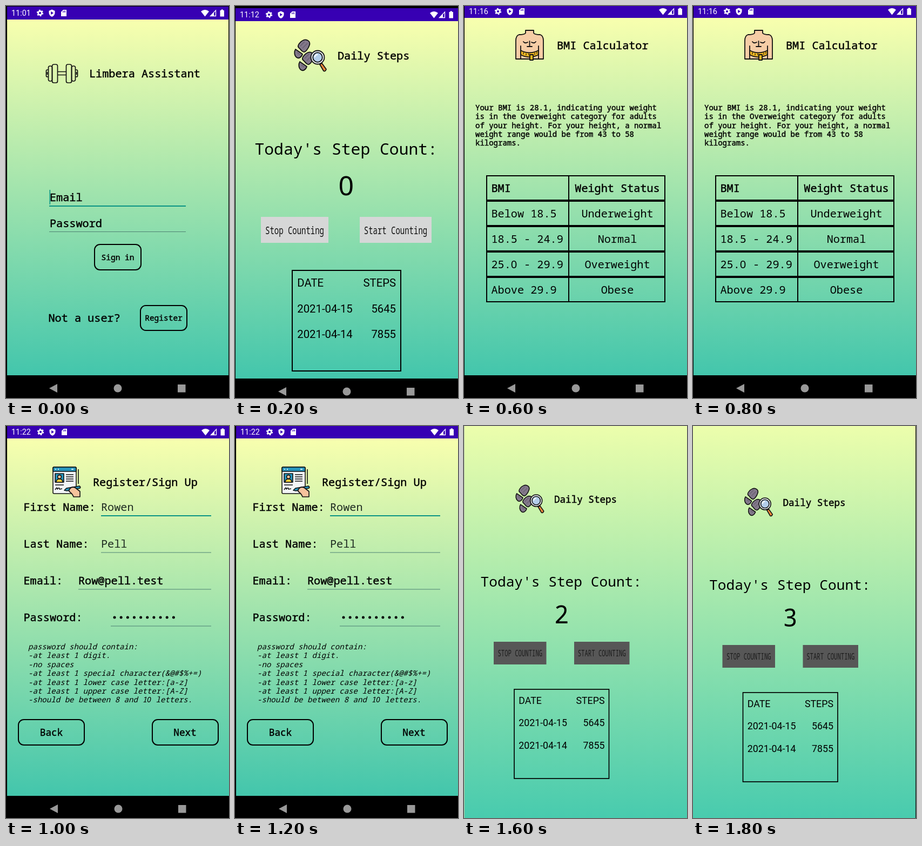
Animation of 413x725 px, one loop 2000 ms. Source, as an HTML page:

```html
<!DOCTYPE html>
<html lang="en">
<head>
<meta charset="utf-8">
<title>App tour</title>
<style>
html, body { margin: 0; width: 100%; height: 100%; overflow: hidden; background: #000; }
svg { display: block; width: 413px; height: 725px; }
text { font-family: "Noto Sans Mono", "DejaVu Sans Mono", monospace; }
.bold { stroke: currentColor; stroke-width: .45px; }
.zero { font-family: "Noto Sans", sans-serif; letter-spacing: .028em; }
.sans { font-family: Roboto, sans-serif; }
.it { font-style: italic; }
</style>
</head>
<body>
<svg id="stage" viewBox="0 0 413 725">
<defs>
  <linearGradient id="sky" x1="0" y1="0" x2="0" y2="1">
    <stop offset="0" stop-color="#f8ffae"/><stop offset="1" stop-color="#43c6ac"/>
  </linearGradient>
  <linearGradient id="skyCut" x1="0" y1="0" x2="0" y2="1">
    <stop offset="0" stop-color="#ecfeac"/><stop offset="1" stop-color="#48cbae"/>
  </linearGradient>

  <g id="dumbbell" fill="none" stroke="#111" stroke-width="1.7" stroke-linejoin="round">
    <path d="M22 14.5H38M22 20.5H38"/>
    <g id="plates">
      <rect x="12" y="1" width="10" height="34" rx="3"/>
      <rect x="5" y="4" width="7" height="28" rx="3"/>
      <path d="M5 11H3Q1 11 1 13V22Q1 24 3 24H5M3 15V20"/>
    </g>
    <use href="#plates" transform="translate(60) scale(-1 1)"/>
  </g>

  <g id="steps" stroke="#111" stroke-width="1.8" stroke-linejoin="round">
    <g id="foot" fill="#82788a">
      <path d="M9 15C5 11 13 3 18 1C24 -1 31 3 29 10C27 17 21 24 18 23C14 22 13 18 9 15Z"/>
      <path d="M3 18L16 27C14 33 9 36 5 33C1 30 0 23 3 18Z"/>
      <path d="M12 12L20 4M16 16L25 7M6 24L11 28" stroke="#655c6e" stroke-width="1.2"/>
    </g>
    <use href="#foot" transform="translate(8 23)"/>
    <path d="M48 46L52 44L60 55Q58 60 55 58Z" fill="#f08a3c"/>
    <circle cx="44" cy="33" r="12.5" fill="#e8edf2"/>
    <circle cx="44" cy="33" r="8.8" fill="#b3cdea"/>
    <path d="M39 33Q39 28 44 28" fill="none" stroke="#fff"/>
  </g>

  <g id="torso" stroke="#111" stroke-width="1.8" stroke-linejoin="round" stroke-linecap="round">
    <path d="M19 1H34V6Q36 9 46 9Q52 11 52 20V54H43V30V54H10V30V54H1V20Q1 11 7 9Q17 9 19 6Z" fill="#f6cda6"/>
    <path d="M15 22Q18 26 23 23M30 23Q35 26 38 22M26.5 21V30M22 31H31" fill="none"/>
    <path d="M10 38Q26 47 43 38V46Q26 55 10 46Z" fill="#f5b922"/>
    <path d="M27 46H33V56H27Z" fill="#f5b922"/>
    <path d="M15 42V45M20 44V47M25 44V47M36 43V46M40 41V44" stroke-width="1.2"/>
  </g>

  <g id="form" stroke="#111" stroke-width="1.6" stroke-linejoin="round">
    <rect x="1" y="1" width="43" height="49" rx="2" fill="#f2f5f7"/>
    <path d="M1 9V3Q1 1 3 1H42Q44 1 44 3V9Z" fill="#2695bd"/>
    <path d="M5 5H7M10 5H12M35 5H39" stroke="#fff"/>
    <rect x="5" y="13" width="16" height="16" fill="#2695bd"/>
    <path d="M7 29Q7 23 13 23Q19 23 19 29Z" fill="#ffd13b"/>
    <circle cx="13" cy="19" r="3.4" fill="#f6c39c"/>
    <path d="M25 15H39M25 19H39M25 23H39M25 27H39M5 34H21M48 5V32M5 43Q9 36 9 42Q13 37 13 42L18 41" fill="none"/>
    <path d="M22 44L26 40L50 36Q53 38 51 40L27 45Z" fill="#2695bd"/>
    <path d="M31 43Q35 36 42 39L51 46V56H39Q37 50 31 46Z" fill="#f6c39c"/>
  </g>

  <g id="home" stroke="#111" stroke-width="1.8" stroke-linejoin="round">
    <rect x="1" y="1" width="57" height="45" rx="3" fill="#d9dce0"/>
    <path d="M1 8V4Q1 1 4 1H55Q58 1 58 4V8Z" fill="#45a4ee"/>
    <path d="M4 4.5H6M8 4.5H10M12 4.5H14M42 43H50M52 43H55"/>
    <path d="M19 24V36H40V24L29.500 15Z" fill="#ffd23e"/>
    <path d="M14 26L29.500 13L45 26L42 28L29.500 18L17 28Z" fill="#f0b62a"/>
    <path d="M25 36V28H34V36" fill="#a88a35"/>
  </g>

  <g id="person" stroke="#222c3c" stroke-width="1.1" stroke-linejoin="round">
    <circle cx="18" cy="18" r="17.500" fill="#c5ddfa"/>
    <path d="M5 31Q6 23 14 22H22Q30 23 31 31Q18 41 5 31Z" fill="#34588a"/>
    <path d="M14 22L18 33L22 22Z" fill="#fff"/>
    <path d="M17 24H19L20 30L18 33L16 30Z" fill="#c8453c"/>
    <path d="M12 10V15Q13 22 18 22Q23 22 24 15V10Z" fill="#f8d2b3"/>
    <path d="M11 14Q9 5 16 4Q25 2 25 14L23 10H13Z" fill="#2d4a63"/>
  </g>

  <g id="status" fill="#fff">
    <circle cx="63" r="3.400" fill="none" stroke="#fff" stroke-width="2.600"/>
    <circle cx="63" r="5.200" fill="none" stroke="#fff" stroke-width="2" stroke-dasharray="2.720"/>
    <path d="M85 -6.500L90.500 -4V0Q90 5 85 7Q80 5 79.500 0V-4Z"/>
    <path d="M83.200 -3L88 0L83.200 3Z" fill="#3700b3"/>
    <path d="M106 -6H112V6H102V-2Z"/>
    <path d="M105.500 -3.500V-1M107.500 -4.500V-1M109.500 -4.500V-1" stroke="#3700b3"/>
    <path d="M368.500 6.500L361 -3Q368.500 -9 376 -3Z"/>
    <path d="M378.500 5.500H388.500V-5Z" fill="none" stroke="#fff" stroke-width="1.300"/>
    <path d="M378 6L385 -1V6Z"/>
    <path d="M396.500 -5H398.500V-6.500H402V-5H404V6.500H396.500Z"/>
  </g>
  <g id="nav" fill="#999">
    <path d="M80 0L95 -8V8Z"/><circle cx="207" r="7.500"/><rect x="318" y="-7" width="14.500" height="14.500"/>
  </g>
</defs>
</svg>
<script>
const stage = document.getElementById('stage');
const TITLE = 20.2;
const TEAL = '#0b9484';
const NAME = 'Rowen';

const text = (s, x, y, size, cls = '', extra = '') =>
  `<text x="${x}" y="${y}" font-size="${size}" class="${cls}" ${extra}>${
    cls.includes('sans') ? s : s.replace(/0/g, '<tspan class="zero">0</tspan>')}</text>`;
const mid = (s, x, y, size, cls) => text(s, x, y, size, cls, 'text-anchor="middle"');
const end = (s, x, y, size, cls) => text(s, x, y, size, cls, 'text-anchor="end"');
const icon = (id, x, y, k = 1) => `<use href="#${id}" transform="translate(${x} ${y}) scale(${k})"/>`;
const fill = (x, y, w, h, color) => `<rect x="${x}" y="${y}" width="${w}" height="${h}" fill="${color}"/>`;
const frame = (x, y, w, h, rx = 0, sw = 2, color = 'none') =>
  `<rect x="${x}" y="${y}" width="${w}" height="${h}" rx="${rx}" fill="${color}" stroke="#000" stroke-width="${sw}"/>`;
const rule = (x1, x2, y, color = '#4f8274', w = 1.1) =>
  `<path d="M${x1} ${y}H${x2}" stroke="${color}" stroke-width="${w}"/>`;
const lines = (list, x, y, step, size, cls) =>
  list.map((s, i) => text(s, x, y + i * step, size, cls)).join('');

// Phone screen: status bar from top to head, navigation bar from foot down
function phone(time, left, top, head, foot, navX = 0) {
  const w = 413 - left - (left === 2 && !navX ? 1 : 0);
  const y = head - 12;
  return fill(0, 0, 413, 725, '#000') +
    fill(left, head, w, foot - head, 'url(#sky)') +
    fill(left, top, w, head - top, '#3700b3') +
    `<text x="${left + 8}" y="${y + 5}" font-size="14.4" class="sans" fill="#fff">${time}</text>` +
    icon('status', navX, y) + icon('nav', navX, foot + 24);
}

function login() {
  return phone('11:01', 2, 1, 25, 683) +
    icon('dumbbell', 73.500, 107) +
    text('Limbera Assistant', 154, 132, TITLE, 'bold') +
    text('Email', 81, 361, TITLE, 'bold') +
    fill(80.500, 340, 1.600, 27, TEAL) +
    rule(80, 333, 370, TEAL, 2) +
    text('Password', 81, 409, TITLE, 'bold') +
    rule(80, 333, 417.500) +
    frame(164, 441, 86, 47, 10) + mid('Sign in', 207, 470, 14.5, 'bold') +
    text('Not a user?', 78.500, 584, TITLE, 'bold') +
    frame(249, 554, 86, 46, 10) + mid('Register', 292, 582, 14.5, 'bold');
}

function history(x, y, w, h, size, right, sw) {
  const rows = [['DATE', 'STEPS'], ['2021-04-15', '5645'], ['2021-04-14', '7855']];
  const step = size * 2.330;
  return frame(x, y, w, h, 0, sw) + rows.map(([a, b], i) => {
    const base = y + size * 1.500 + i * step;
    return text(a, x + size * .46, base, size, 'sans') + end(b, right, base, size, 'sans');
  }).join('');
}

// Condensed caption, as on the counting buttons
function key(label, x, y, w, h, size, color, ink) {
  return fill(x, y, w, h, color) +
    `<g transform="translate(${x + w / 2} ${y + h / 2 + size * .38}) scale(.685 1)">${
      text(label, 0, 0, size, '', `text-anchor="middle" fill="${ink}"`)}</g>`;
}

function daily() {
  return phone('11:12', 1, 4, 28, 689) +
    icon('steps', 109, 62) +
    text('Daily Steps', 190, 99, TITLE, 'bold') +
    text("Today's Step Count:", 36.500, 275, 29.7) +
    mid('0', 206.500, 350, 50) +
    key('Stop Counting', 48, 390, 125, 48, 20.4, '#d6d7d7', '#111') +
    key('Start Counting', 231, 390, 133, 48, 20.4, '#d6d7d7', '#111') +
    history(106, 489, 201, 186, 20.3, 298, 2);
}

function walking(count, dx, dy) {
  return fill(0, 0, 413, 725, 'url(#skyCut)') +
    (dx ? fill(412, 0, 1, 725, '#111') : fill(0, 0, 1, 725, '#b9c9a8')) +
    `<g transform="translate(${dx} ${dy})">` +
    icon('steps', 95, 109, .88) +
    text('Daily Steps', 167, 142, 17.6, 'bold') +
    text("Today's Step Count:", 30.500, 297, 26.200) +
    mid(count, 180.500, 365, 45) +
    key('STOP COUNTING', 55, 399, 97.500, 42, 15.5, '#575757', '#1c1c1c') +
    key('START COUNTING', 204, 399, 102.500, 42, 15.5, '#575757', '#1c1c1c') +
    history(93, 487, 175.500, 165, 17.8, 260.500, 1.700) + '</g>';
}

function bmi() {
  const rows = [['BMI', 'Weight Status'], ['Below 18.5', 'Underweight'], ['18.5 - 24.9', 'Normal'],
    ['25.0 - 29.9', 'Overweight'], ['Above 29.9', 'Obese']];
  const note = ['Your BMI is 28.1, indicating your weight', 'is in the Overweight category for adults',
    'of your height. For your height, a normal', 'weight range would be from 43 to 58', 'kilograms.'];
  return phone('11:16', 1, 0, 22, 683) +
    icon('torso', 95, 44) +
    text('BMI Calculator', 172, 80, TITLE, 'bold') +
    lines(note, 21, 193, 16.350, 14, 'bold') +
    frame(42, 314, 330, 233) + '<path d="M194 314V547" stroke="#000" stroke-width="2"/>' +
    rows.map(([a, b], i) => {
      const y = 344 + i * 47, cls = i ? '' : 'bold';
      return text(a, 50.500, y, TITLE, cls) + mid(b, 284, y, TITLE, cls) +
        (i ? rule(41, 373, 313 + i * 47, '#000', 4) : '');
    }).join('');
}

function register() {
  const fields = [['First Name:', NAME, 176], ['Last Name:', 'Pell', 176],
    ['Email:', 'Row@pell.test', 134], ['Password:', '', 194]];
  const tips = ['password should contain:', '-at least 1 digit.', '-no spaces',
    '-at least 1 special character(&amp;@#$%+=)', '-at least 1 lower case letter:[a-z]',
    '-at least 1 upper case letter:[A-Z]', '-should be between 8 and 10 letters.'];
  let dots = '';
  for (let i = 0; i < 10; i++) dots += `<circle cx="${201 + i * 12.150}" cy="354" r="2.500"/>`;
  return phone('11:22', 2, 0, 23, 684, 1) +
    icon('form', 86, 75) +
    text('Register/Sign Up', 161, 111, TITLE, 'bold') +
    fields.map(([label, value, x], i) => {
      const y = 157 + i * 68;
      return text(label, 32.500, y, TITLE, 'bold') +
        text(value, x, y, TITLE, i === 2 ? 'bold' : '', i === 2 ? '' : 'fill="#1d2a20"') +
        (i ? rule(x, 380, y + 9) : rule(x, 380, y + 9, TEAL, 2));
    }).join('') + dots +
    lines(tips, 41, 413, 16.400, 14.1, 'it') +
    frame(23, 543, 122, 47, 10) + mid('Back', 84, 573, 17.7, 'bold') +
    frame(271, 543, 122, 47, 10) + mid('Next', 331.500, 573, 17.7, 'bold');
}

function menu() {
  const items = [['Step Counter', 'steps', 18, 18, .6], ['BMI Calculator', 'torso', 16.500, 18, .62],
    ['Personal Information', 'person', 18, 18, 1]];
  return phone('11:23', 2, 4, 28, 685) +
    frame(317, 37, 87, 46, 10, 1.400, '#ff4500') +
    text('Log Out', 330, 66, 14.5, 'bold', 'fill="#35150a" color="#35150a"') +
    icon('home', 110.500, 129) +
    text('Hello ' + NAME, 190, 160, TITLE, 'bold') +
    items.map(([label, id, ox, oy, k], i) => {
      const y = 305 + i * 125;
      return `<ellipse cx="207" cy="${y}" rx="32" ry="27.700" fill="#9c9c9c" fill-opacity=".55" stroke="#222" stroke-width="1.200"/>` +
        icon(id, 207 - ox, y - oy, k) + mid(label, 207, y + 43.800, 14.5, 'bold');
    }).join('');
}

const LOOP = 2000;
const scenes = [
  [0, login()], [200, daily()], [600, bmi()], [1000, register()], [1400, menu()],
  [1600, walking('2', 0, 0)], [1800, walking('3', -.500, 6)]
].map(([start, body]) => {
  const node = document.createElementNS('http://www.w3.org/2000/svg', 'g');
  node.innerHTML = body;
  stage.appendChild(node);
  return { start, node };
});

function draw(t) {
  const now = scenes.filter(s => s.start <= t).pop();
  for (const s of scenes) s.node.style.display = s === now ? '' : 'none';
}

const t0 = performance.now();
function tick() {
  draw((performance.now() - t0) % LOOP);
  requestAnimationFrame(tick);
}
tick();
</script>
</body>
</html>
```
